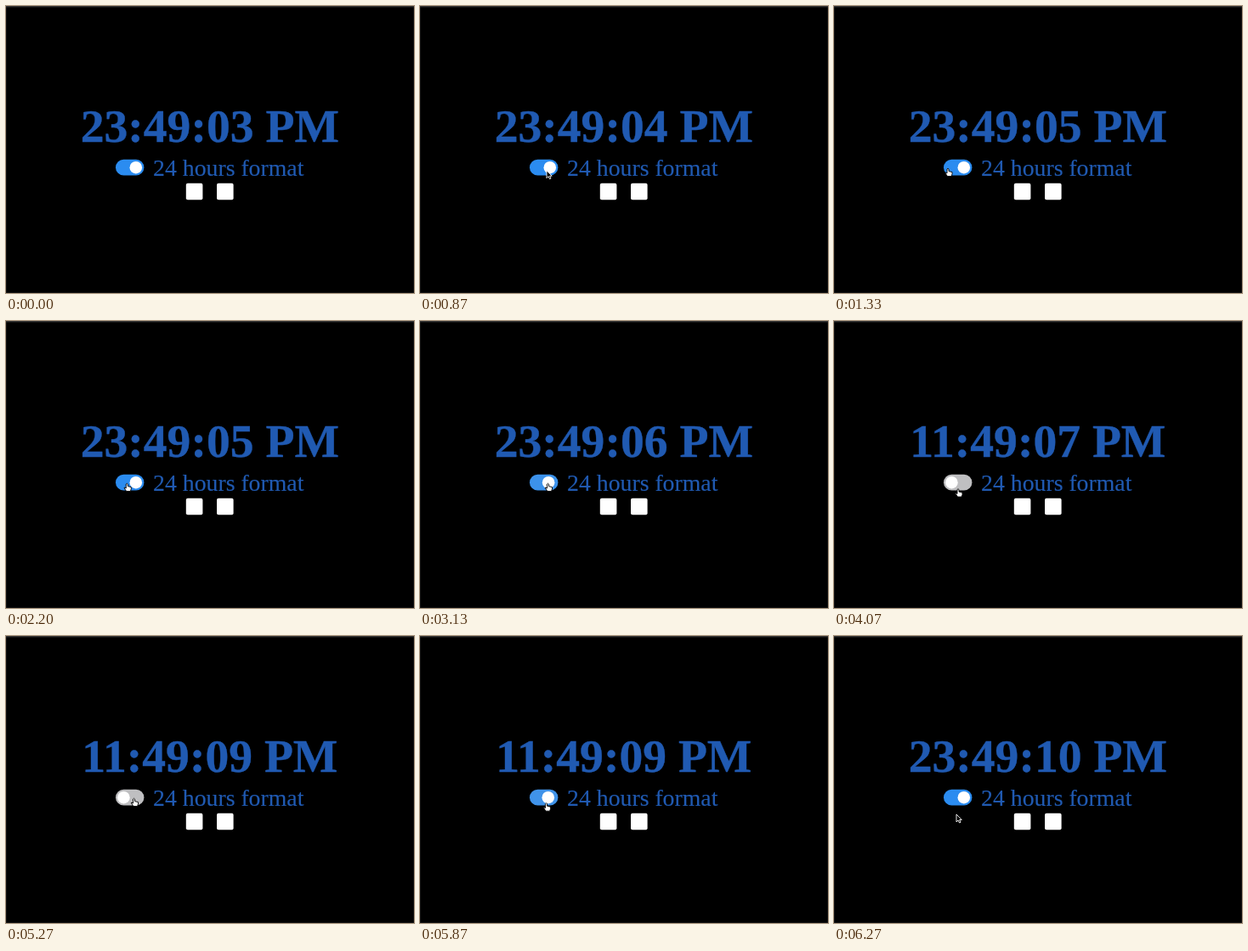
An HTML page for the animation above (6.34 s loop, 480x338 px).

```html
<!DOCTYPE html>
<html lang="en">
<head>
<meta charset="utf-8">
<title>Digital clock</title>
<style>
  html, body { margin: 0; width: 100%; height: 100%; overflow: hidden; background: #000; }
  svg { display: block; width: 100%; height: 100%; }
  text { fill: #205ab2; stroke: #205ab2; font-family: "Liberation Serif", "Times New Roman", serif; }
  #clock { font-size: 55.6px; font-weight: bold; text-anchor: middle; stroke-width: .4px; }
  #label { font-size: 27.75px; stroke-width: .15px; }
  #cursor path { stroke-linejoin: round; stroke-width: .9px; }
</style>
</head>
<body>
<svg viewBox="0 0 480 338">
  <rect width="480" height="338" stroke="#222"/>
  <rect width="480" height="1.4" fill="#333"/>
  <text id="clock" x="239.8" y="160.4">23:49:03 PM</text>
  <rect id="track" x="129" y="180.8" width="33.4" height="18.8" rx="9.4"/>
  <circle id="knob" cy="190.2" r="7.3" fill="#fff"/>
  <text id="label" x="173.1" y="199.5">24 hours format</text>
  <rect x="211.8" y="208.7" width="19.6" height="19.6" rx="2" fill="#fff"/>
  <rect x="248" y="208.7" width="19.6" height="19.6" rx="2" fill="#fff"/>
  <g id="cursor">
    <path id="arrow" d="M0 0V9L2 7L3.5 10L5 9.3L3.6 6.5H6.2Z" fill="#000" stroke="#fff"/>
    <path id="hand" d="M-1 1Q0 -.5 1 1V3.6L5 4.6V7L4 9.6H-.5L-3 6V5L-1 6Z" fill="#fff" stroke="#000"/>
  </g>
</svg>
<script>
const LOOP = 6340, FRAME = 200 / 3, FIRST_TICK = 266;
const SWITCH_OFF = 3100, SWITCH_ON = 5640, SWITCH_TIME = 400;
const CURSOR_IN = 130, HAND_FROM = 1260;

const $ = id => document.getElementById(id);
const clock = $("clock"), track = $("track"), knob = $("knob");
const cursor = $("cursor"), arrow = $("arrow"), hand = $("hand");
const show = (el, on) => el.setAttribute("visibility", on ? "visible" : "hidden");
const progress = (t, start, end) => Math.min(1, Math.max(0, (t - start) / (end - start)));
const ease = p => 1 - (1 - p ** 1.3) ** 3;

function pointerAt(t) {
  const enter = progress(t, CURSOR_IN, 1000);
  const left = progress(t, 1200, 1333);
  const right = progress(t, 1933, 2467);
  const dip = Math.sin(Math.PI * progress(t, 3867, 4267));
  const leave = progress(t, 5700, 6267);
  return {
    x: 127 + 26 * enter - 19 * left + 16.5 * right - 4.5 * dip - 6.5 * leave,
    y: 203 - 11 * enter - left + 6.5 * dip + 19 * leave
  };
}

function clockText(t) {
  const ticks = Math.floor((t - FIRST_TICK) / 1000) + 1;
  const lastTick = FIRST_TICK + (ticks - 1) * 1000;
  // The format follows the switch only at the next tick.
  const hours = lastTick > SWITCH_OFF && lastTick < SWITCH_ON ? 11 : 23;
  return `${hours}:49:${String(3 + ticks).padStart(2, "0")} PM`;
}

function draw(t) {
  const text = clockText(t);
  if (clock.textContent !== text) clock.textContent = text;

  const turn = start => ease(progress(t, start, start + SWITCH_TIME));
  const on = 1 - turn(SWITCH_OFF) + turn(SWITCH_ON);
  knob.setAttribute("cx", 138.4 + 14.4 * on);
  track.style.fill = `color-mix(in srgb, #2b8cf0 ${on * 100}%, #bfbfc1)`;

  const { x, y } = pointerAt(t);
  const visible = t >= CURSOR_IN, overSwitch = t >= HAND_FROM && y < 199;
  cursor.setAttribute("transform", `translate(${x} ${y})`);
  show(arrow, visible && !overSwitch);
  show(hand, visible && overSwitch);
}

const start = performance.now();
function play(now) {
  const t = Math.max(0, now - start) % LOOP;
  draw(Math.floor((t + 4) / FRAME) * FRAME);
  requestAnimationFrame(play);
}
draw(0);
requestAnimationFrame(play);
</script>
</body>
</html>
```
